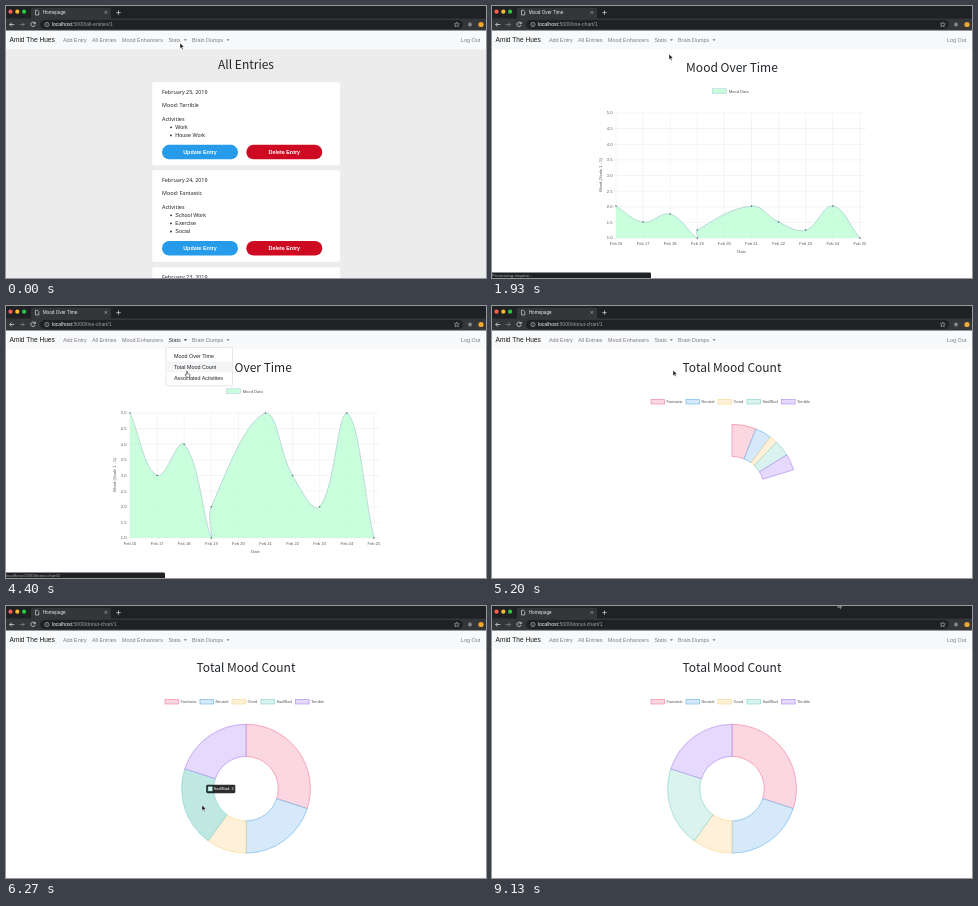
Animation of 480 by 272 pixels, one loop 9190 ms. Source, as an HTML page:

```html
<!DOCTYPE html>
<html lang="en">
<head>
<meta charset="utf-8">
<title>Mood tracker</title>
<style>
html, body { margin: 0; width: 100%; height: 100%; overflow: hidden; background: #fff; }
#stage { display: block; width: 100vw; height: 100vh; font-family: "Liberation Sans", Arial, sans-serif; }
.title { font-family: "Noto Sans CJK SC", "Noto Sans CJK JP", "Noto Sans", sans-serif; }
.body { font-family: "Noto Sans", sans-serif; }
text { white-space: pre; }
</style>
</head>
<body>
<svg id="stage" viewBox="0 0 480 272"></svg>
<script>
const LOOP = 9190;
const stage = document.getElementById('stage');

// Timeline in ms
const MENUS = [[560, 1300], [4130, 4600]];
const LOADS = [
  { click: 1300, commit: 1540, swap: 1800, done: 2200 },
  { click: 4600, commit: 4870, swap: 5050, done: 5180 }
];
const LINE_START = 1860, DONUT_START = 5146;
const CURSOR = [
  [0, 174, 37], [200, 174, 37], [330, 172, 36], [680, 172, 36], [1000, 177, 48],
  [2180, 177, 48], [2600, 215, 80], [3070, 222, 171], [3130, 222, 171], [3670, 173, 35],
  [4070, 173, 35], [4390, 181, 65], [5560, 181, 64], [5870, 196, 150], [6080, 192, 165],
  [6350, 197, 208], [6600, 220, 228], [6860, 224, 229], [7040, 262, 216], [7130, 279, 182],
  [7600, 276, 154], [7930, 276, 154], [8070, 252, 130], [8470, 252, 130], [9100, 346, -4], [9190, 346, -4]
];
// [time, hovered slice]; -1 is none
const HOVERS = [[5880, 4], [6160, 3], [6480, 2], [6930, 1], [7080, 0], [8560, -1]];

const SLICES = [
  { name: 'Fantastic', n: 3, fill: '#fbd7e1', hover: '#facbd9', line: '#f27a9b', x: 159 },
  { name: 'Neutral', n: 2, fill: '#d5e9fa', hover: '#bddcf6', line: '#63b1ea', x: 194 },
  { name: 'Good', n: 1, fill: '#fff0d9', hover: '#ffe4b8', line: '#f7d588', x: 226 },
  { name: 'Sad/Bad', n: 2, fill: '#dbf3ef', hover: '#c0e8e2', line: '#7fd0c8', x: 255 },
  { name: 'Terrible', n: 2, fill: '#e5d9fe', hover: '#d5c2fc', line: '#a983f3', x: 289.5 }
];
// [day in February, mood]
const MOODS = [[16, 5], [17, 3], [18, 4], [19, 1], [19, 2], [21, 5], [22, 3], [23, 2], [24, 5], [25, 1]];

const clamp = (v, a, b) => Math.min(b, Math.max(a, v));
const mix = (a, b, p) => a + (b - a) * p;
const easeOut = p => 1 - (1 - clamp(p, 0, 1)) ** 4;
const within = (t, [a, b]) => t >= a && t < b;

const text = (x, y, size, str, fill = '#212529', more = '') =>
  `<text x="${x}" y="${y}" font-size="${size}" fill="${fill}" ${more}>${str}</text>`;
const rect = (x, y, w, h, fill, more = '') =>
  `<rect x="${x}" y="${y}" width="${w}" height="${h}" fill="${fill}" ${more}/>`;
const path = (d, stroke, w = .7, fill = 'none', more = '') =>
  `<path d="${d}" stroke="${stroke}" stroke-width="${w}" fill="${fill}" ${more}/>`;
const dot = (x, y, r, fill) => `<circle cx="${x}" cy="${y}" r="${r}" fill="${fill}"/>`;
const mid = 'text-anchor="middle"';
const heading = (y, str) => text(240, y, 12, str, '#212529', mid + ' class="title"');

function browser(t, name, route, loading) {
  const icon = loading
    ? path('M31 4.2a2.3 2.3 0 1 1-2.3 2.3', '#d5d8dc', .8, 'none', `transform="rotate(${t * .4} 31 6.5)"`)
    : path('M29.5 4.3h2l1.3 1.3v3.4h-3.3z', '#e8eaed', .6);
  const reload = loading
    ? path('M25.3 16.5l4 4m0-4l-4 4', '#e8eaed', .8)
    : path('M29 17.2a2.2 2.2 0 1 0 .2 1.8M29.3 15.8v1.9h-1.9', '#e8eaed', .7);
  return rect(0, 0, 480, 13, '#202124') + rect(0, 12.5, 480, 12, '#35363a') +
    rect(25, 1.8, 80, 12, '#35363a', 'rx="2"') +
    dot(4.5, 5.7, 2.1, '#fb5f57') + dot(11.3, 5.7, 2.1, '#fdbc2e') + dot(18.1, 5.7, 2.1, '#28c840') +
    icon + text(36.7, 8.3, 4.7, name, '#e8eaed') +
    path('M98.7 5.2l2.4 2.4m0-2.4l-2.4 2.4', '#c4c7cb', .6) + path('M110.3 6.6h4.4m-2.2-2.2v4.4', '#d5d8dc', .7) +
    rect(34, 14, 423, 9, '#202124', 'rx="4.5"') +
    path('M8.3 18.5H3.7m2-2l-2 2l2 2', '#e8eaed') + path('M13.7 18.5h4.6m-2-2l2 2l-2 2', '#85888c') + reload +
    path('M43 18.5a2.1 2.1 0 1 1-4.2 0a2.1 2.1 0 1 1 4.2 0M40.9 18.2v1.4m0-2.6v.5', '#c4c7cb', .6) +
    text(45.8, 20.3, 5.13, `localhost:<tspan fill="#9aa0a6">5000/${route}/1</tspan>`, '#f1f3f4') +
    path('M450.7 16l.7 1.7 1.8.1-1.4 1.2.5 1.8-1.6-1-1.6 1 .5-1.8-1.4-1.2 1.8-.1z', '#c4c7cb', .5) +
    dot(464, 18.5, 1.9, '#85888c') + dot(475, 18.5, 2.6, '#f0a830');
}

function navbar(statsOn) {
  const gray = '#7b7c7d', stats = statsOn ? '#303133' : gray;
  const link = (x, str, c = gray) => text(x, 36, 5.42, str, c);
  const caret = (x, c) => path(`M${x} 33.2h3.2l-1.6 1.7z`, 'none', 0, c);
  return rect(0, 24, 480, 19.3, '#f8f9fa') + text(3.5, 36.3, 6.6, 'Amid The Hues', '#1a1a1a') +
    link(57, 'Add Entry') + link(86, 'All Entries') + link(116, 'Mood Enhancers') +
    link(162.5, 'Stats', stats) + caret(177.8, stats) + link(186, 'Brain Dumps') + caret(220.5, gray) +
    link(455, 'Log Out');
}

function card(y, day, mood, items) {
  const by = y + 46.4 + 8.2 * items.length;
  const line = (dy, str) => text(156, y + dy, 5.4, str, '#212529', 'class="body"');
  const button = (x, str, fill) => rect(x, by, 76, 14.5, fill, 'rx="7.25"') +
    text(x + 38, by + 9.2, 5.42, str, '#fff', mid + ' font-weight="bold"');
  return rect(146, y, 188.5, by - y + 21, '#fff', 'rx="1.5" stroke="#e2e2e2" stroke-width=".4"') +
    line(11.9, `February ${day}, 2019`) + line(25.3, 'Mood: ' + mood) + line(38.6, 'Activities') +
    items.map((s, i) => dot(165, y + 45.3 + 8.1 * i, .9, '#212529') + text(169.3, y + 47 + 8.1 * i, 5.42, s)).join('') +
    button(156, 'Update Entry', '#259bea') + button(240.3, 'Delete Entry', '#cd0a22');
}

const entries = () => rect(0, 43, 480, 229, '#ececec') + heading(63, 'All Entries') +
  card(76, 25, 'Terrible', ['Work', 'House Work']) +
  card(164, 24, 'Fantastic', ['School Work', 'Exercise', 'Social']) +
  card(261, 23, 'Neutral', ['Work']);

// Smooth curve through points, control points kept inside the plot
function spline(pts) {
  const inside = y => clamp(y, 107, 232);
  const handles = pts.map((p, i) => {
    const a = pts[i - 1] || p, b = pts[i + 1] || p;
    const da = Math.hypot(p[0] - a[0], p[1] - a[1]), db = Math.hypot(b[0] - p[0], b[1] - p[1]);
    const k = .4 / (da + db || 1), at = d => [p[0] + (b[0] - a[0]) * k * d, inside(p[1] + (b[1] - a[1]) * k * d)];
    return [at(-da), at(db)];
  });
  return 'M' + pts[0] + pts.slice(1).map((p, i) => `C${handles[i][1]} ${handles[i + 1][0]} ${p}`).join('');
}

function lineChart(t) {
  const p = easeOut((t - LINE_START) / 1000);
  const X = d => 124 + (d - 16) * 27.1, Y = m => 232 - (m - 1) * 31.25;
  let out = heading(66.2, 'Mood Over Time') +
    rect(220.5, 82.8, 14, 4.6, '#c8ffdc', 'stroke="#9fc3d6" stroke-width=".5"') + text(236.7, 86.5, 4.1, 'Mood Data', '#555');
  for (let i = 0; i < 9; i++) {
    const m = 1 + i / 2;
    out += path(`M120.5 ${Y(m)}H374`, '#e4e4e4', .4) +
      text(120.5, Y(m) + 1.4, 4.1, m.toFixed(1), '#555', 'text-anchor="end"');
  }
  for (let d = 16; d < 26; d++)
    out += path(`M${X(d)} 107V235.5`, '#e4e4e4', .4) + text(X(d), 238.8, 4.1, 'Feb ' + d, '#555', mid);
  out += text(249.5, 246.6, 4.1, 'Date', '#555', mid) +
    text(0, 0, 4.1, 'Mood (Scale 1 - 5)', '#555', mid + ' transform="translate(109.5 169) rotate(-90)"');
  const pts = MOODS.map(([d, m]) => [X(d), mix(232, Y(m), p)]), curve = spline(pts);
  return out + path(curve + 'V232H124Z', 'none', 0, '#bdffd5', 'fill-opacity=".82"') + path(curve, '#9dbfcb', .6) +
    pts.map(q => dot(q[0], q[1], .75, '#4b6470')).join('');
}

const polar = (a, r) => [240 + r * Math.sin(a), 182.7 - r * Math.cos(a)];
const TURN = Math.PI * 2 / 10;
SLICES.reduce((sum, s) => { s.from = sum * TURN; s.to = (sum + s.n) * TURN; return sum + s.n; }, 0);

function tipBox(s) {
  const [x, y] = polar((s.from + s.to) / 2, 48);
  const w = { Fantastic: 30.7, Neutral: 27.3, Good: 24, 'Sad/Bad': 30, Terrible: 28 }[s.name];
  return [x > 240 ? x - 1 - w : x + 1, y - 4.5, w];
}

function tooltip(t, i) {
  if (i < 0) return '';
  const [start, idx] = HOVERS[i];
  if (idx < 0) return '';
  const s = SLICES[idx], to = tipBox(s), from = i ? tipBox(SLICES[HOVERS[i - 1][1]]) : to;
  const p = easeOut((t - start) / 400);
  const [x, y, w] = to.map((v, k) => mix(from[k], v, p));
  const show = i ? 1 : p;
  return `<svg x="${x}" y="${y}" width="${w}" height="9" opacity="${show}">` +
    rect(0, 0, w, 9, '#000', 'rx="1.8" fill-opacity=".82"') +
    rect(2, 2.4, 4.2, 4.2, s.fill, `stroke="${s.line}" stroke-width=".5"`) +
    text(7.4, 6, 4.1, `${s.name}: ${s.n}`, '#fff') + '</svg>';
}

function donut(t) {
  const p = easeOut((t - DONUT_START) / 1000);
  const i = HOVERS.findLastIndex(h => t >= h[0]), active = i < 0 ? -1 : HOVERS[i][1];
  let out = heading(66.2, 'Total Mood Count');
  SLICES.forEach((s, k) => {
    const a = s.from * p, b = s.to * p, big = b - a > Math.PI ? 1 : 0;
    out += rect(s.x, 93.6, 13.6, 4.4, s.fill, `stroke="${s.line}" stroke-width=".6"`) + text(s.x + 15.4, 97.2, 4, s.name, '#555');
    if (p > 0) out += path(`M${polar(a, 64.4)}A64.4 64.4 0 ${big} 1 ${polar(b, 64.4)}L${polar(b, 32.2)}` +
      `A32.2 32.2 0 ${big} 0 ${polar(a, 32.2)}Z`, s.line, .6, k === active ? s.hover : s.fill);
  });
  return out + tooltip(t, i);
}

function menu(active) {
  return rect(160, 41.5, 66.5, 38.3, '#fff', 'rx="1.2" stroke="#cfcfcf" stroke-width=".5"') +
    (active < 0 ? '' : rect(160.3, 44.8 + 10.8 * active, 66, 10.6, '#f4f5f6')) +
    ['Mood Over Time', 'Total Mood Count', 'Associated Activities']
      .map((s, i) => text(168, 52 + 10.8 * i, 5.42, s)).join('');
}

function cursorAt(t) {
  const i = CURSOR.findLastIndex(k => t >= k[0]), a = CURSOR[i], b = CURSOR[i + 1] || a;
  const p = clamp((t - a[0]) / (b[0] - a[0] || 1), 0, 1), e = p * p * (3 - 2 * p);
  return [mix(a[1], b[1], e), mix(a[2], b[2], e)];
}

const pointer = (x, y, hand) => path(hand
  ? 'M-.6 .4q.7-.7 1.1.2v2l2 .5q.7.3.6 1l-.5 2.2h-2.9l-1.7-2.4q0-.9 1.4 0z'
  : 'M0 0v5.6l1.3-1.2 .9 2 1-.5-.9-1.9h1.8z', hand ? '#111' : '#fff', .5, hand ? '#fff' : '#111',
  `transform="translate(${x} ${y})"`);

function status(t) {
  let str = '';
  LOADS.forEach(l => { if (within(t, [l.click + 60, l.done])) str = 'Processing request...'; });
  if (within(t, [800, 1360])) str = 'localhost:5000/line-chart/1';
  if (within(t, [3870, 4250])) str = 'localhost:5000/line-chart/1#';
  if (within(t, [4250, 4660])) str = 'localhost:5000/donut-chart/1';
  return str && rect(-2, 266.5, 161, 8, '#202124', 'rx="1.2"') + text(0, 271.2, 4.3, str, '#a9adb2');
}

const SHADE = `<defs><radialGradient id="shade" cx=".5" cy="1" r=".5" gradientTransform="translate(0 0)">
  <stop offset="0" stop-color="#000" stop-opacity=".26"/><stop offset=".8" stop-color="#000" stop-opacity=".16"/>
  <stop offset="1" stop-color="#000" stop-opacity="0"/></radialGradient></defs>` +
  rect(90, 267, 300, 10, 'url(#shade)');

function draw(t) {
  const [first, second] = LOADS;
  const page = t < first.swap ? entries() : t < second.swap ? lineChart(t) : donut(t);
  const [name, route] = t < first.commit ? ['Homepage', 'all-entries']
    : t < second.commit ? ['Mood Over Time', 'line-chart'] : ['Homepage', 'donut-chart'];
  const loading = LOADS.some(l => within(t, [l.click, l.swap + 60]));
  const open = MENUS.some(m => within(t, m));
  const [x, y] = cursorAt(t);
  const onStats = t > 200 && x > 161 && x < 182 && y > 29 && y < 40;
  const item = open && y > 44 ? Math.floor((y - 44.8) / 10.8) : -1;
  stage.innerHTML = rect(0, 0, 480, 272, '#fff') + page + SHADE + navbar(onStats || open) +
    browser(t, name, route, loading) + (open ? menu(item) : '') + status(t) +
    pointer(x, y, onStats || item >= 0);
}

const begin = performance.now();
function tick() {
  draw((performance.now() - begin) % LOOP);
  requestAnimationFrame(tick);
}
tick();
</script>
</body>
</html>
```
